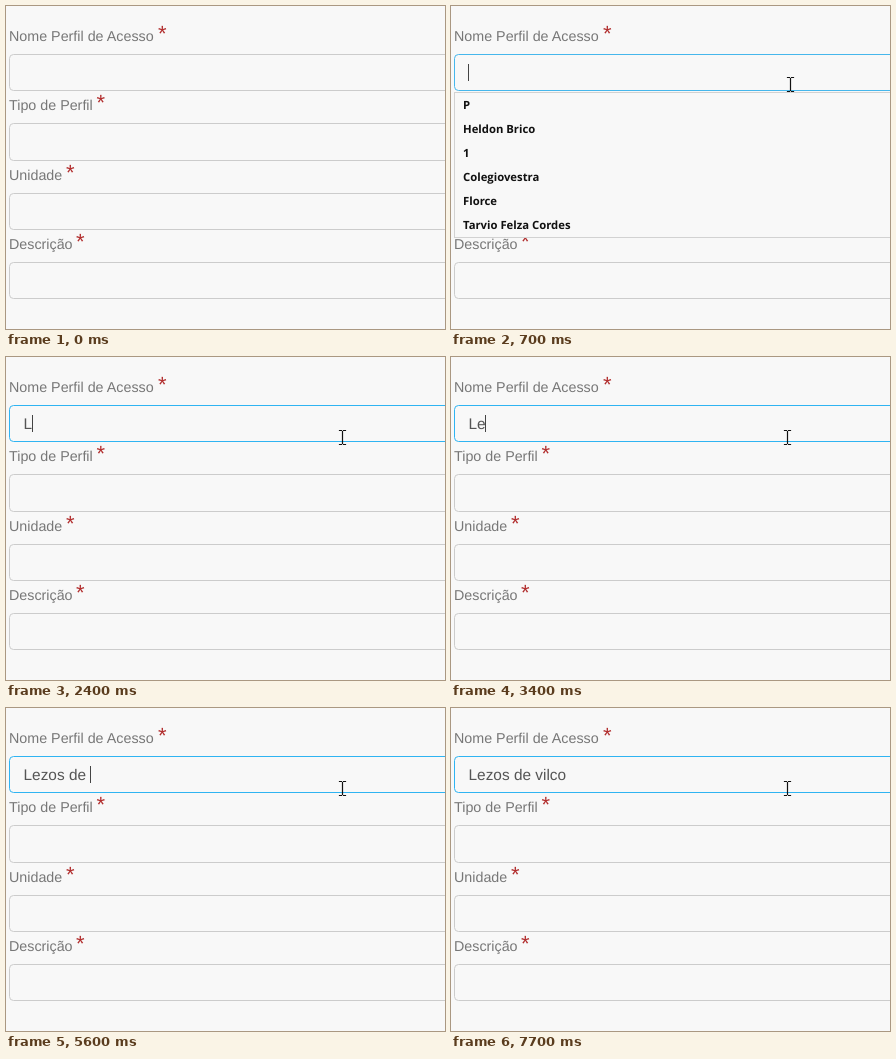
Recreate the animation shown at these times as an HTML page. Size 439 px wide and 323 px high, loop 8 s.

```html
<!DOCTYPE html>
<html lang="pt">
<head>
<meta charset="utf-8">
<style>
  html, body { margin: 0; width: 100%; height: 100%; overflow: hidden; background: #f8f8f8; }
  svg { display: block; width: 439px; height: 323px; }
  text { font-family: "Liberation Sans", Arial, sans-serif; white-space: pre; text-rendering: geometricPrecision; }
  .label { font-size: 14.3px; fill: #777; }
  .star { font-size: 22px; fill: #b22f2f; }
  .typed { font-size: 15.4px; fill: #555; }
  .option { font: 700 11.3px "Open Sans", "Noto Sans", sans-serif; fill: #111; }
  .field { fill: #f8f8f8; stroke: #ccc; }
</style>
</head>
<body>
<svg id="stage" viewBox="0 0 439 323"></svg>
<script>
const LOOP = 8000, TICK = 100, BLINK = 466;
const TEXT_X = 17.54;
const stage = document.getElementById('stage');

function add(tag, attrs, content = '', parent = stage) {
  const node = document.createElementNS('http://www.w3.org/2000/svg', tag);
  for (const key in attrs) node.setAttribute(key, attrs[key]);
  node.textContent = content;
  return parent.appendChild(node);
}

const show = (node, on) => node.setAttribute('visibility', on ? 'visible' : 'hidden');

// Form rows: label, x of the required mark, top and height of the field
const rows = [
  ['Nome Perfil de Acesso', 152, 48.5, 36],
  ['Tipo de Perfil', 90.5, 117.5, 37],
  ['Unidade', 60, 187.5, 36],
  ['Descrição', 70, 256.5, 36]
];
const fields = rows.map(([label, starX, y, height]) => {
  const base = Math.round(y - 13.6);
  add('text', { class: 'label', x: 3, y: base }, label);
  add('text', { class: 'star', x: starX, y: base }, '*');
  return add('rect', { class: 'field', x: 3.5, y, width: 460, height, rx: 4 });
});

const list = add('g', {});
add('rect', { x: 3.5, y: 86.5, width: 460, height: 145, fill: '#f8f8f8', stroke: '#d2d2d2' }, '', list);
['P', 'Heldon Brico', '1', 'Colegiovestra', 'Florce', 'Tarvio Felza Cordes'].forEach((name, i) =>
  add('text', { class: 'option', x: 12, y: 103 + 24 * i }, name, list));

const typed = add('text', { class: 'typed', x: TEXT_X, y: 72 });
const caret = add('rect', { y: 58, width: 1, height: 17, fill: '#444' });
const pointer = add('path', {
  d: 'M-3-7H-1M1-7H3M0-6V6M-3 7H-1M1 7H3', fill: 'none', stroke: '#111',
  'stroke-width': 1.2, 'stroke-linecap': 'square'
});

const FOCUS = 600, LIST_OPEN = 700, LIST_CLOSE = 2400;
const phrase = 'Lezos de vilco';
const keyTimes = [2300, 3400, 3800, 3900, 4100, 4300, 5200, 5300, 5600, 6200, 6400, 6700, 7100, 7200];
const pointerPath = [
  [100, 400.5, 50.5], [200, 371.5, 61.5], [300, 349.5, 73.5], [400, 339.5, 78.5], [1300, 336.5, 80.5]
];

function borderColor(t) {
  const k = t < FOCUS ? 0 : Math.min(1, 0.4 + (t - FOCUS) / 220);
  const mix = (from, to) => Math.round(from + (to - from) * k);
  return `rgb(${mix(204, 47)},${mix(204, 180)},${mix(204, 242)})`;
}

function render(time) {
  const t = Math.floor(time / TICK) * TICK;

  const spot = pointerPath.filter(p => p[0] <= t).pop();
  show(pointer, spot);
  if (spot) pointer.setAttribute('transform', `translate(${spot[1]} ${spot[2]})`);

  fields[0].style.stroke = borderColor(t);
  show(list, t >= LIST_OPEN && t < LIST_CLOSE);

  const count = keyTimes.filter(k => k <= t).length;
  typed.textContent = phrase.slice(0, count);

  // The blink restarts on focus and on every key press
  const since = t - (count ? keyTimes[count - 1] : FOCUS);
  const width = count ? typed.getComputedTextLength() : 0;
  caret.setAttribute('x', Math.floor(TEXT_X + width));
  show(caret, since >= 0 && Math.floor(since / BLINK) % 2 === 0);
}

const start = performance.now();
function frame() {
  render((performance.now() - start) % LOOP);
  requestAnimationFrame(frame);
}
frame();
</script>
</body>
</html>
```
